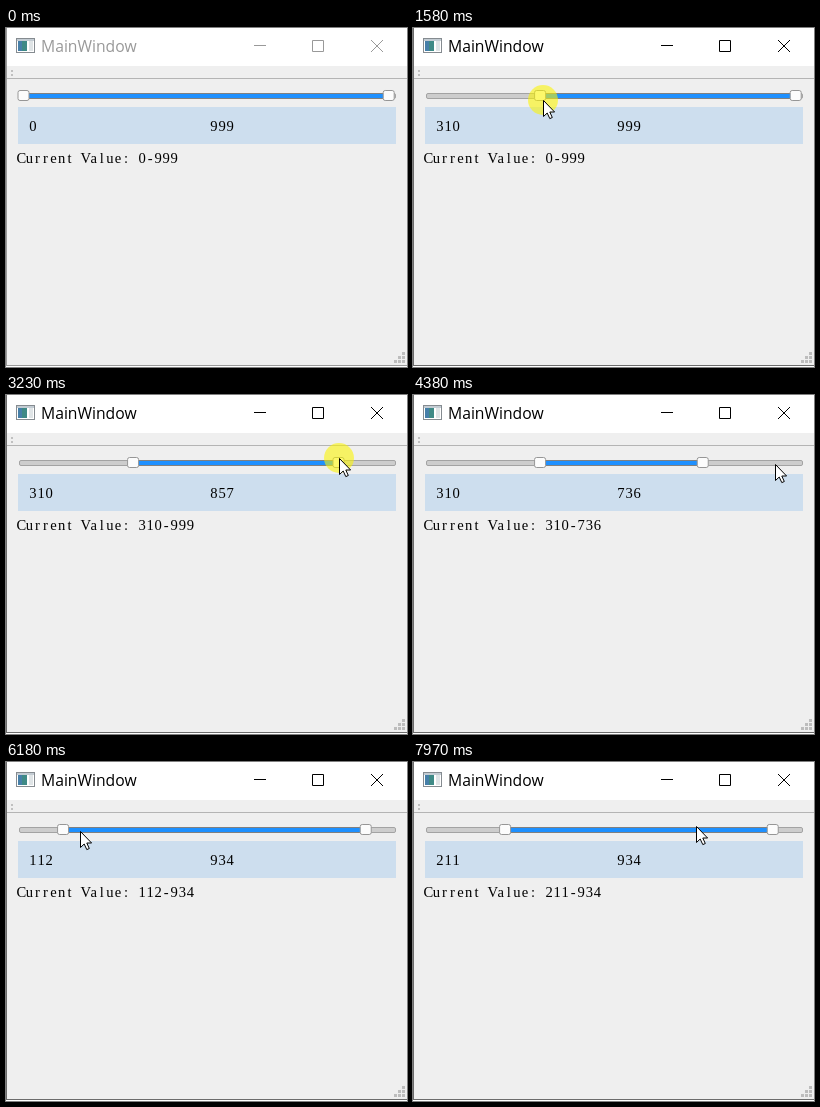
Write an HTML page that moves like this. It is 401 by 339 pixels and loops after 8000 ms.

```html
<!DOCTYPE html>
<html lang="en">
<head>
<meta charset="utf-8">
<title>MainWindow</title>
<style>
  html, body { margin: 0; width: 100%; height: 100%; overflow: hidden; background: #f0f0f0; }
  svg { display: block; }
  .title { font: 15.7px "Open Sans", "Noto Sans", sans-serif; }
  .cell { font: 14.6px "Liberation Serif", "Noto Serif", serif; text-anchor: middle; fill: #000; }
  .thumb { fill: #fcfcfc; stroke: #969696; }
</style>
</head>
<body>
<svg width="401" height="339" viewBox="0 0 401 339">
  <rect width="401" height="339" fill="#efefef"/>
  <rect width="401" height="38" fill="#fff"/>
  <rect y="50" width="401" height="1" fill="#b4b4b4"/>
  <path d="M5 42h2v2h-2zM5 46h2v2h-2z" fill="#c0c0c0"/>

  <g>
    <rect x="10.5" y="10.5" width="18" height="14" fill="#fff" stroke="#858b90"/>
    <rect x="11" y="11" width="17" height="2" fill="#c3ccd3"/>
    <rect x="12" y="13" width="9" height="10" fill="#3f8a86"/>
    <rect x="12" y="13" width="4" height="10" fill="#467fa8"/>
    <rect x="23" y="13" width="4" height="10" fill="#dfe4e6"/>
  </g>
  <text id="title" class="title" x="35" y="24">MainWindow</text>
  <path id="buttons" fill="none" d="M248 17.5h12M306.5 12.5h11v11h-11zM365 12l12 12M377 12l-12 12"/>

  <rect x="13.5" y="65.5" width="376" height="5" rx="1.5" fill="#cdcdcd" stroke="#a3a3a3"/>
  <rect id="range" y="65.5" height="5" fill="#1e90ff" stroke="#808080"/>
  <rect id="low" class="thumb" y="62.5" width="11" height="10" rx="2"/>
  <rect id="high" class="thumb" y="62.5" width="11" height="10" rx="2"/>

  <rect x="12" y="79" width="378" height="37" fill="#cddeee"/>
  <text id="lowText" class="cell" y="103"></text>
  <text id="highText" class="cell" y="103"></text>
  <text id="status" class="cell" y="135"></text>

  <path d="M396 324h3v3h-3zM392 328h3v3h-3zM396 328h3v3h-3zM388 332h3v3h-3zM392 332h3v3h-3zM396 332h3v3h-3z" fill="#bdbdbd"/>
  <path id="border" d="M0 0h1v337h400v1H0z"/>
  <rect y="338" width="401" height="1" fill="#fff"/>

  <circle id="press" r="15" fill="#fbf400" fill-opacity=".58"/>
  <path id="cursor" d="M.5 .5V16.5L4.2 13 6.8 18.6 9.3 17.5 6.8 12H11.6Z" fill="#fff" stroke="#000" stroke-linejoin="round"/>
</svg>
<script>
const LOOP = 8000, TICK = 76, PX = 0.3535, LEFT = 17.5, RIGHT = 382.7, MAX = 999;
const PAGE = 99, GRAB = 8;
const $ = id => document.getElementById(id);

// Pointer moves: start, end, x, y. It rests in between.
const moves = [
  [70, 200, 28, 108], [350, 900, 20.4, 64], [1120, 1580, 130, 72],
  [1730, 2360, 366, 65], [2510, 2910, 383.2, 65],
  [3230, 3230, 333, 63], [3290, 3520, 290.2, 65], [3680, 4460, 363.5, 69],
  [5080, 5390, 74, 67], [5710, 5860, 74, 69], [6190, 6580, 130, 74],
  [6730, 6810, 151, 72], [7190, 7340, 126, 70], [7510, 7740, 276, 60],
  [7890, 7970, 283, 64]
];

// Mouse button: down, up.
const presses = [
  [1050, 1730], [2990, 3680], [4610, 4690], [4930, 5010],
  [5560, 5710], [6030, 6110], [7040, 7110]
];

// Eased progress of a move, advancing once per tick.
function progress(t, start, end) {
  if (t >= end) return 1;
  const n = Math.max(1, Math.round((end - start) / TICK));
  const i = Math.floor((t - start) / (end - start) * n + 0.1);
  const k = (i + 1) / (n + 1);
  return k * k * (3 - 2 * k);
}

function pointer(t) {
  let x = 200, y = 240;
  for (const [start, end, toX, toY] of moves) {
    if (t < start) break;
    const p = progress(t, start, end);
    x += (toX - x) * p;
    y += (toY - y) * p;
  }
  return { x, y };
}

const lowPos = v => LEFT + v * PX;
const highPos = v => RIGHT - (MAX - v) * PX;

// Replays the presses: grabbing a thumb drags it, the groove moves the nearer one a page.
function slider(t) {
  let low = 0, high = MAX, status = "0-999", down = false;
  for (const [start, end] of presses) {
    if (t < start) break;
    const from = pointer(start).x;
    const toLow = from - lowPos(low), toHigh = from - highPos(high);
    const useLow = Math.abs(toLow) < Math.abs(toHigh);
    const gap = useLow ? toLow : toHigh;
    const drag = Math.abs(gap) < GRAB;
    const moved = pointer(Math.min(t, end - 1)).x - from;
    const change = drag ? Math.round(moved / PX) : Math.sign(gap) * PAGE;
    if (useLow) low = Math.max(0, low + change);
    else high = Math.min(MAX, high + change);
    down = t < end;
    if (!down) status = low + "-" + high;
  }
  return { low, high, status, down };
}

function set(id, attrs) {
  for (const name in attrs) $(id).setAttribute(name, attrs[name]);
}

// Text on a fixed grid of cells.
function cells(id, left, text) {
  if ($(id).textContent === text) return;
  $(id).textContent = text;
  set(id, { x: [...text].map((c, i) => left + 4 + i * 8.05).join(" ") });
}

function draw(t) {
  const { x, y } = pointer(t);
  const { low, high, status, down } = slider(t);
  const lowX = lowPos(low), highX = highPos(high);
  const active = t >= presses[0][0];

  set("title", { fill: active ? "#000" : "#999" });
  set("buttons", { stroke: active ? "#000" : "#999" });
  set("border", { fill: active ? "#6c6c6c" : "#9a9a9a" });

  set("low", { x: lowX - 5.5 });
  set("high", { x: highX - 5.5 });
  set("range", { x: lowX, width: highX - lowX });

  cells("lowText", 23, String(low));
  cells("highText", 204, String(high));
  cells("status", 11.3, "Current Value: " + status);

  set("press", { cx: x, cy: y, visibility: down ? "visible" : "hidden" });
  set("cursor", {
    transform: `translate(${Math.round(x)} ${Math.round(y)})`,
    visibility: t >= moves[0][0] ? "visible" : "hidden"
  });
}

function frame() {
  draw(performance.now() % LOOP);
  requestAnimationFrame(frame);
}
frame();
</script>
</body>
</html>
```
